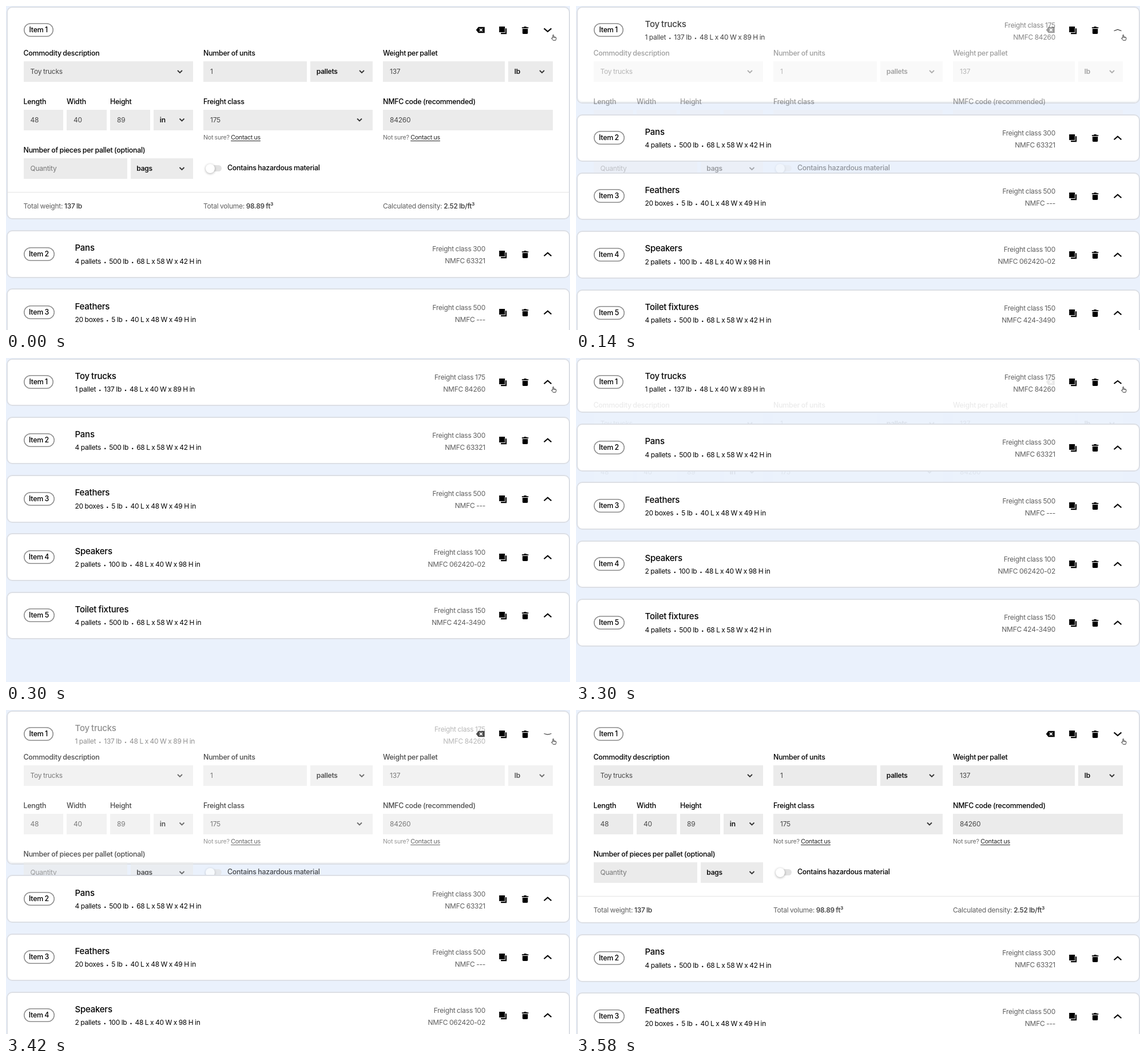
Animation of 986x568 px, one loop 6.58 s. Source, as an HTML page:

```html
<!DOCTYPE html>
<html lang="en">
<head>
<meta charset="utf-8">
<title>Freight items</title>
<style>
html, body { margin: 0; width: 100%; height: 100%; overflow: hidden; background: #eaf1fc; }
#stage {
  position: relative; width: 986px; height: 568px; overflow: hidden; background: #eaf1fc;
  font: 400 12px/20px Inter, Roboto, sans-serif; letter-spacing: -.02em; word-spacing: -.04em;
  color: #000; white-space: nowrap; cursor: default;
}
#stage div, #stage svg { position: absolute; }
#stage svg { left: 0; top: 0; overflow: visible; }
.card {
  left: 1px; width: 984.5px; height: 83.5px; top: .5px; box-sizing: border-box;
  background: #fff; border: 2px solid #dcdfe5; border-radius: 10px;
}
.edge { inset: 0; border-radius: 8px; box-shadow: inset 0 -2px 2px #eef0f3; opacity: var(--mid); }
.row { left: 0; top: 0; width: 986px; height: 84px; }
.pill {
  left: 30.5px; top: 30px; height: 24px; box-shadow: inset 0 0 0 1.5px #8c8c8c;
  border-radius: 12px; line-height: 24px; text-align: center; font-size: 12.4px; font-weight: 500;
}
.title { font-size: 15px; font-weight: 500; }
.dot { display: inline-block; width: 14px; text-align: center; font-size: 8px; letter-spacing: 0; }
.right { right: 148px; color: #5e5e5e; }
.label { font-size: 12.4px; font-weight: 500; }
.field { height: 36px; background: #ebebeb; }
.value { color: #484848; }
.hint { color: #757575; }
.pick { font-weight: 600; color: #111; }
.note { font-size: 10.7px; color: #6b6b6b; }
.note u { color: #222; text-underline-offset: 2px; }
.total { color: #5e5e5e; }
.total b { font-weight: 500; color: #333; }
.rule { left: 2px; width: 982px; top: 326px; height: 1px; background: #e4e4e4; }
.track { left: 350px; top: 279px; width: 27px; height: 11px; border-radius: 6px; background: #e2e2e2; }
.knob { left: 349px; top: 277px; width: 16px; height: 16px; border-radius: 50%; background: #fff; box-shadow: 0 1px 4px #0005; }
.soft { opacity: var(--open); }
.firm { opacity: var(--firm); }
.brief { opacity: var(--brief); }
</style>
</head>
<body>
<div id="stage"></div>
<script>
const LOOP = 6580, STEP = 20, GROWTH = 290.2, PITCH = 102.33;
const stage = document.getElementById('stage');

const items = [
  ['Toy trucks', ['1 pallet', '137 lb', '48 L x 40 W x 89 H in'], '175', '84260'],
  ['Pans', ['4 pallets', '500 lb', '68 L x 58 W x 42 H in'], '300', '63321'],
  ['Feathers', ['20 boxes', '5 lb', '40 L x 48 W x 49 H in'], '500', '---'],
  ['Speakers', ['2 pallets', '100 lb', '48 L x 40 W x 98 H in'], '100', '062420-02'],
  ['Toilet fixtures', ['4 pallets', '500 lb', '68 L x 58 W x 42 H in'], '150', '424-3490']
];

// y is the middle of the capitals
const text = (x, y, cls, str) => `<div class="${cls}" style="left:${x}px;top:${y - 10}px">${str}</div>`;
const right = (y, str) => `<div class="right" style="top:${y - 10}px">${str}</div>`;
const svg = (cls, body) => `<svg class="${cls}" width="986" height="84">${body}</svg>`;

const copyIcon = '<path d="M862.2 36h10v10h-10zM875.2 39.2v10h-10v-2.1h7.9v-7.9z"/>';
const trashIcon = '<path d="M901.9 37.2h2.9l1.1-1.2h3.4l1.1 1.2h2.9v1.8h-11.4zM902.9 40h9.4v7.6q0 1.4-1.4 1.4h-6.6q-1.4 0-1.4-1.4z"/>';
const backIcon = `<path d="M821.8 42l4-5.2h11v10.4h-11z"/>
  <path d="M828 39.6l4.8 4.8m0-4.8l-4.8 4.8" stroke="#fff" stroke-width="1.5"/>`;
const arrow = `<path d="M940.6 45.2L947 39.7l6.4 5.5" fill="none" stroke="#000" stroke-width="2.1"/>`;

function brief([name, parts, grade, code]) {
  return text(120.5, 31.7, 'title', name) +
    text(120.5, 55, '', parts.join('<span class="dot">•</span>')) +
    right(33.7, 'Freight class ' + grade) + right(54.8, 'NMFC ' + code);
}

function header(item, i) {
  const width = i ? 54 : 52.5;
  return `<div class="pill" style="width:${width}px">Item ${i + 1}</div>` +
    `<div class="row ${i ? '' : 'brief'}">${brief(item)}</div>` +
    svg('', copyIcon + trashIcon + `<g class="${i ? '' : 'flip'}">${arrow}</g>`);
}

// left, right, top, value, style of value, arrow centre
const fields = [
  [30.5, 327, 97, 'Toy trucks', 'value', 304],
  [345, 526, 97, '1', 'value'],
  [532, 641, 97, 'pallets', 'pick', 622],
  [659, 872, 97, '137', 'value'],
  [878, 955.5, 97, 'lb', 'pick', 937],
  [30.5, 100, 181.5, '48', 'value'],
  [106, 176, 181.5, '40', 'value'],
  [182, 252, 181.5, '89', 'value'],
  [258, 327, 181.5, 'in', 'pick', 307.5],
  [345, 641, 181.5, '175', 'value', 618],
  [659, 955.5, 181.5, '84260', 'value'],
  [30.5, 212, 267, 'Quantity', 'hint'],
  [217.5, 327, 267, 'bags', 'pick', 307.5]
];
const labels = [
  [30.5, 83.3, 'Commodity description'], [345, 83.3, 'Number of units'], [659, 83.3, 'Weight per pallet'],
  [30.5, 168, 'Length'], [106, 168, 'Width'], [182, 168, 'Height'],
  [345, 168, 'Freight class'], [659, 168, 'NMFC code (recommended)'],
  [30.5, 253.2, 'Number of pieces per pallet (optional)'],
  [387, 284.4, 'Contains hazardous material']
];
const totals = [[30.5, 'Total weight', '137 lb'], [345, 'Total volume', '98.89 ft³'], [659, 'Calculated density', '2.52 lb/ft³']];

function field([l, r, top, str, cls, at]) {
  const mid = top + 18;
  const pad = cls === 'pick' ? 10.8 : 12;
  const mark = at
    ? svg('firm', `<path d="M${at - 4} ${mid - 2}l4 4 4-4" fill="none" stroke="#333" stroke-width="1.8"/>`)
    : '';
  return `<div class="field soft" style="left:${l}px;top:${top}px;width:${r - l}px"></div>` +
    text(l + pad, mid, cls + ' firm', str) + mark;
}

const form = fields.map(field).join('') +
  labels.map(([x, y, str]) => text(x, y, 'label firm', str)).join('') +
  [345, 659].map(x => text(x, 230.8, 'note firm', 'Not sure? <u>Contact us</u>')).join('') +
  '<div class="rule soft"></div><div class="soft"><div class="track"></div><div class="knob"></div></div>' +
  totals.map(([x, name, val]) => text(x, 351, 'total firm', `${name}: <b>${val}</b>`)).join('') +
  svg('firm', backIcon);

const hand = svg('', `<g transform="translate(953 50)" fill="#fff" stroke="#333" stroke-width="1" stroke-linejoin="round">
  <path d="M2.8 6.3V1.5q0-1 .9-1t.9 1v2.7l3.2.6q1.2.3 1.1 1.5l-.4 2.3-.7 1.6H3.6L.5 6.7q.4-1 1.3-.7z"/>
  <path d="M4.6 4.2v1.7m1.5-1.4v1.4m1.5-1.1v1.1" fill="none" stroke-width=".7"/></g>`);

stage.innerHTML = '<div class="card" id="first"><div class="edge"></div></div>' +
  `<div class="row">${header(items[0], 0)}</div>` + form +
  items.slice(1).map((item, i) =>
    `<div class="row later"><div class="card"></div>${header(item, i + 1)}</div>`).join('') + hand;

const first = document.getElementById('first');
const flip = stage.querySelector('.flip');
const later = [...stage.querySelectorAll('.later')];

// cubic-bezier(0, 0, .58, 1)
function easeOut(x) {
  if (x <= 0) return 0;
  if (x >= 1) return 1;
  let lo = 0, hi = 1;
  for (let i = 0; i < 24; i++) {
    const s = (lo + hi) / 2;
    if (1.74 * s * s * (1 - s) + s * s * s < x) lo = s; else hi = s;
  }
  return lo * lo * (3 - 2 * lo);
}

function openness(t) {
  if (t < 300) return 1 - easeOut(t < 80 ? t * .334 / 80 : .334 + (t - 80) * .666 / 220);
  return t < 3300 ? 0 : easeOut((t - 3293) / 275);
}

function draw(t) {
  const open = openness(Math.floor(t / STEP) * STEP);
  const shift = GROWTH * open;
  const vars = { open, firm: open ** .8, brief: (1 - open) ** .8, mid: 4 * open * (1 - open) };
  for (const key in vars) stage.style.setProperty('--' + key, vars[key]);
  first.style.height = 83.5 + shift + 'px';
  later.forEach((row, i) => { row.style.top = (i + 1) * PITCH + shift + 'px'; });
  flip.setAttribute('transform', `translate(0 42.3) scale(1 ${1 - 2 * open}) translate(0 -42.3)`);
}

const start = performance.now();
function tick() {
  draw((performance.now() - start) % LOOP);
  requestAnimationFrame(tick);
}
tick();
</script>
</body>
</html>
```
